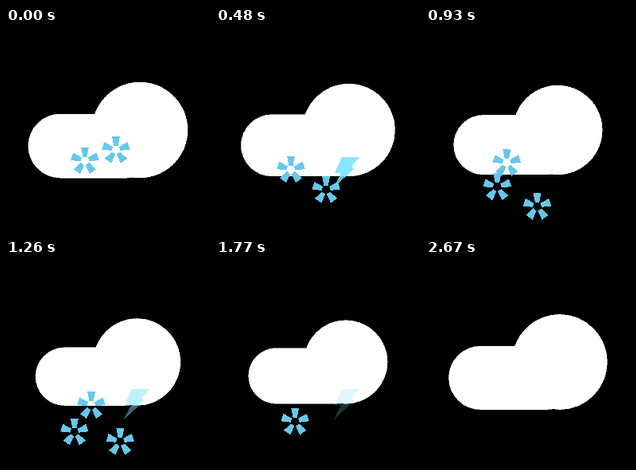
An HTML page that plays this animation: 256 px wide and 256 px high, repeating every 2700 ms.

```html
<!DOCTYPE html>
<html lang="en">
<head>
<meta charset="utf-8">
<title>Snow cloud</title>
<style>
html, body { margin: 0; width: 100%; height: 100%; overflow: hidden; background: #000; }
svg { display: block; width: 100vw; height: 100vh; shape-rendering: crispEdges; }
</style>
</head>
<body>
<svg viewBox="0 0 256 256">
  <defs>
    <path id="arm" d="M-5-17H5L2.6-5H-2.6Z"/>
    <g id="flake" fill="#66c8ec">
      <use href="#arm"/>
      <use href="#arm" transform="rotate(72)"/>
      <use href="#arm" transform="rotate(144)"/>
      <use href="#arm" transform="rotate(216)"/>
      <use href="#arm" transform="rotate(288)"/>
    </g>
  </defs>
  <g id="cloud" fill="#fff" stroke="#fff" stroke-width=".6">
    <rect x="28" y="108" width="164" height="80" rx="40"/>
    <circle cx="168" cy="128" r="60"/>
  </g>
  <path id="bolt" fill="#74e1ff" d="M158 162H180L170 174 173 177 148 200 157 182H149Z"/>
  <use class="flake" href="#flake"/>
  <use class="flake" href="#flake"/>
  <use class="flake" href="#flake"/>
</svg>
<script>
const LOOP = 2700, STEP = 30, FALL = 1350, TURN = 0.75 * LOOP;
const cloud = document.getElementById('cloud');
const bolt = document.getElementById('bolt');
const flakes = document.querySelectorAll('.flake');

// Position of each flake for its progress p, 0 to 1
const falls = [
  { start: 0, x: p => 99 - 14 * p, y: p => 166.5 + 53 * p * p * (2 - p) },
  { start: 0, x: p => 138 + 7 * p ** 4, y: p => 228 - 75 * (1 - p) ** 2.5 },
  { start: 900, x: p => 99 - 14 * p + 12.5 * Math.sin(Math.PI * p ** 0.7), y: p => 168 + 54 * p }
];

const pulse = (t, peak, reach) => Math.max(0, 1 - Math.abs(t - peak) / reach);

function draw(now) {
  const t = Math.floor(now % LOOP / STEP) * STEP;
  const shrink = t < TURN ? t / TURN : (LOOP - t) / (LOOP - TURN);
  cloud.setAttribute('transform', `translate(128 128) scale(${1 - 0.147 * shrink}) translate(-128 -128)`);
  bolt.setAttribute('opacity', pulse(t, 525, 285) + pulse(t, 1470, 390));
  falls.forEach(({ start, x, y }, i) => {
    const p = (t - start) / FALL;
    const falling = p >= 0 && p <= 1;
    flakes[i].setAttribute('visibility', falling ? 'visible' : 'hidden');
    if (falling) flakes[i].setAttribute('transform', `translate(${x(p)} ${y(p)})`);
  });
}

const start = performance.now();
function tick() {
  draw(performance.now() - start);
  requestAnimationFrame(tick);
}
tick();
</script>
</body>
</html>
```
